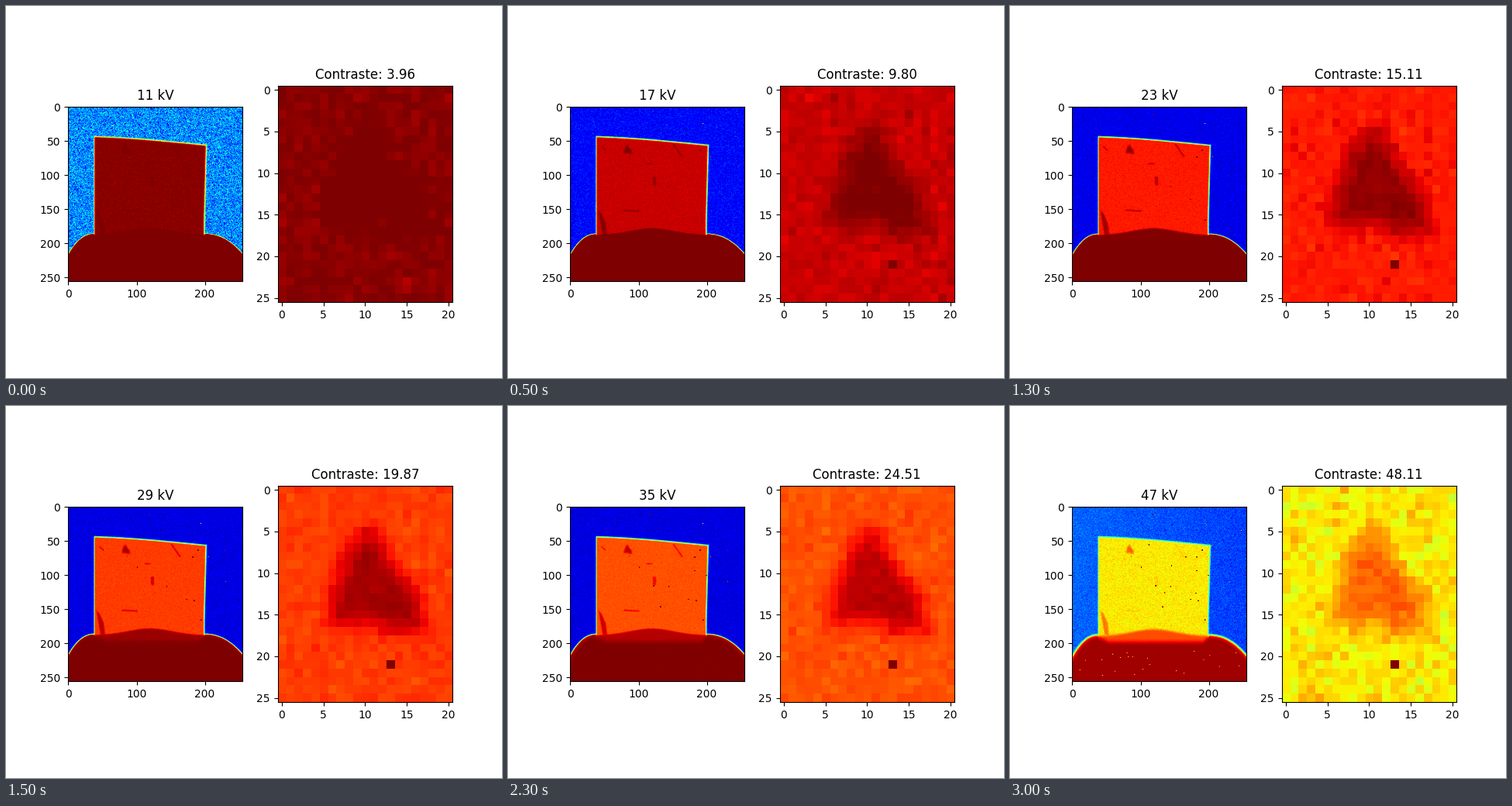
Recreate the animation shown at these times as a matplotlib script. Size 640 px wide and 480 px high, loop 3.5 s.

```python
import numpy as np
import matplotlib.pyplot as plt
from matplotlib.animation import FuncAnimation
from matplotlib.path import Path

SIZE = 256
CROP_X, CROP_Y = 73, 52
CROP = (slice(CROP_Y, CROP_Y + 26), slice(CROP_X, CROP_X + 21))
CONTRASTS = ["3.96", "9.80", "15.11", "19.87", "24.51", "23.77", "48.11"]
STEPS = len(CONTRASTS)
LEFT, RIGHT = 38, 199  # where the sample meets the dome

NOTCH = [(9.3, 4), (11.6, 4), (14, 8), (17.6, 13), (18, 18),
         (12, 18), (10.5, 17), (4.7, 17), (4.8, 13), (7, 7)]
CHIP = [(41, 152), (46, 157), (52, 171), (54, 188), (47, 188), (43, 165)]
# Scratches: start, end, half width
SCRATCHES = [((151, 56), (163, 73), 1.2), ((123, 105), (123, 113), 2.6),
             ((112, 84), (119, 84), 1.0), ((79, 152), (100, 153), 1.2),
             ((46, 59), (51, 64), 1.0)]

yy, xx = np.mgrid[:SIZE, :SIZE].astype(float)
rng = np.random.default_rng(4)


def segment_distance(a, b):
    (ax, ay), (bx, by) = a, b
    dx, dy = bx - ax, by - ay
    t = np.clip(((xx - ax) * dx + (yy - ay) * dy) / (dx * dx + dy * dy), 0, 1)
    return np.hypot(xx - ax - t * dx, yy - ay - t * dy)


def depth(points):
    """Distance to the outline, positive inside."""
    dist = np.min([segment_distance(a, b)
                   for a, b in zip(points, points[1:] + points[:1])], axis=0)
    grid = np.column_stack([xx.ravel(), yy.ravel()])
    inside = Path(points).contains_points(grid).reshape(SIZE, SIZE)
    return np.where(inside, dist, -dist)


def ramp(d, width, shift=0.5):
    return np.clip((d + shift) / width, 0, 1)


def blend(a, b, t):
    return a + (b - a) * t


def sample_shape():
    top = 43.2 + 12.5 * np.clip((xx - LEFT) / 162, 0, 1) ** 1.4
    right = 202.8 - 3 * ramp(yy - 57, 110)
    return np.minimum.reduce([ramp(yy - top, 3.2), ramp(right - xx, 3.2),
                              ramp(xx - LEFT + 0.5, 1.6)])


def dome_shape():
    """Depths below the visible top and below the front face."""
    x = xx[0]
    side = np.maximum((LEFT - x) / 38, (x - RIGHT) / 56)
    arc = 186 + 29.5 * np.clip(side, 0, None) ** 2.2
    bump = 188 - 10 * np.exp(-((x - 119) / 45) ** 2)
    top = np.where(side > 0, arc, bump)
    slope = np.hypot(1, np.gradient(arc))
    middle = np.clip(np.minimum((x - LEFT) / 15, (RIGHT - x) / 8), 0, 1)
    front = blend(top, 194, middle)
    return (yy - top) / slope, (yy - front) / slope


sample_mask = sample_shape()
dome_top, dome_front = dome_shape()
notch_mask = ramp(depth([(x + CROP_X, y + CROP_Y) for x, y in NOTCH]), 3.2, 0.6)
chip_mask = 0.85 * ramp(depth(CHIP), 2.2, 0.8)
scratch_mask = 0.6 * np.max([np.clip(half + 0.5 - segment_distance(a, b), 0, 1)
                             for a, b, half in SCRATCHES], axis=0)

fixed_noise = rng.normal(size=(SIZE, SIZE))
hot_x, hot_y = rng.integers([100, 3], [254, 180], size=(24, 2)).T
dull_x, dull_y = rng.integers([8, 212], [248, 254], size=(22, 2)).T


def scan(i):
    """Exposure model: levels settle with voltage; the last scan is dimmer."""
    dim = float(i == STEPS - 1)
    air = 0.085 + 0.175 * np.exp(-1.5 * i) + dim * (0.14 - 0.04 * xx / SIZE)
    air_sd = 0.021 + 0.069 * np.exp(-1.4 * i) + 0.009 * dim
    body = 0.80 + 0.19 * np.exp(-(i / 2.3) ** 1.3) - 0.144 * dim
    body_sd = 0.011 + 0.017 * dim
    flaw = 1.02 - 0.018 * i - 0.11 * dim
    rim = 1.04 - 0.022 * i - 0.08 * dim
    core = 1.03 - 0.008 * i - 0.012 * dim
    noise = 0.65 * fixed_noise + 0.76 * rng.normal(size=(SIZE, SIZE))

    flaws = np.maximum.reduce([notch_mask, chip_mask,
                               scratch_mask * (1 - 0.7 * dim)])
    sample = blend(body, flaw, flaws) + body_sd * noise * (1 - 0.5 * flaws)
    img = blend(air + air_sd * noise, sample, sample_mask)
    dome = blend(rim, core, ramp(dome_front, 9)) + 0.003 * noise
    img = blend(img, dome, ramp(dome_top, 1.4 + 0.25 * i + 1.6 * dim))
    img = np.clip(img, 0, 1)

    # Stuck pixels read far above the scale
    if i > 0:
        img[CROP_Y + 21, CROP_X + 13] = 1
    count = 4 * i
    img[hot_y[:count], hot_x[:count]] = 3
    if dim:
        img[dull_y, dull_x] = 0.5
    return img


scans = [scan(i) for i in range(STEPS)]

fig, (left, right) = plt.subplots(1, 2, figsize=(6.4, 4.8), dpi=100)
full = left.imshow(scans[0], cmap="jet", vmin=0, vmax=1)
detail = right.imshow(scans[0][CROP], cmap="jet", vmin=0, vmax=1)


def draw(i):
    full.set_data(scans[i])
    detail.set_data(scans[i][CROP])
    left.set_title(f"{11 + 6 * i} kV")
    right.set_title(f"Contraste: {CONTRASTS[i]}")
    return full, detail


anim = FuncAnimation(fig, draw, frames=STEPS, interval=500, repeat=True)
plt.show()
```
